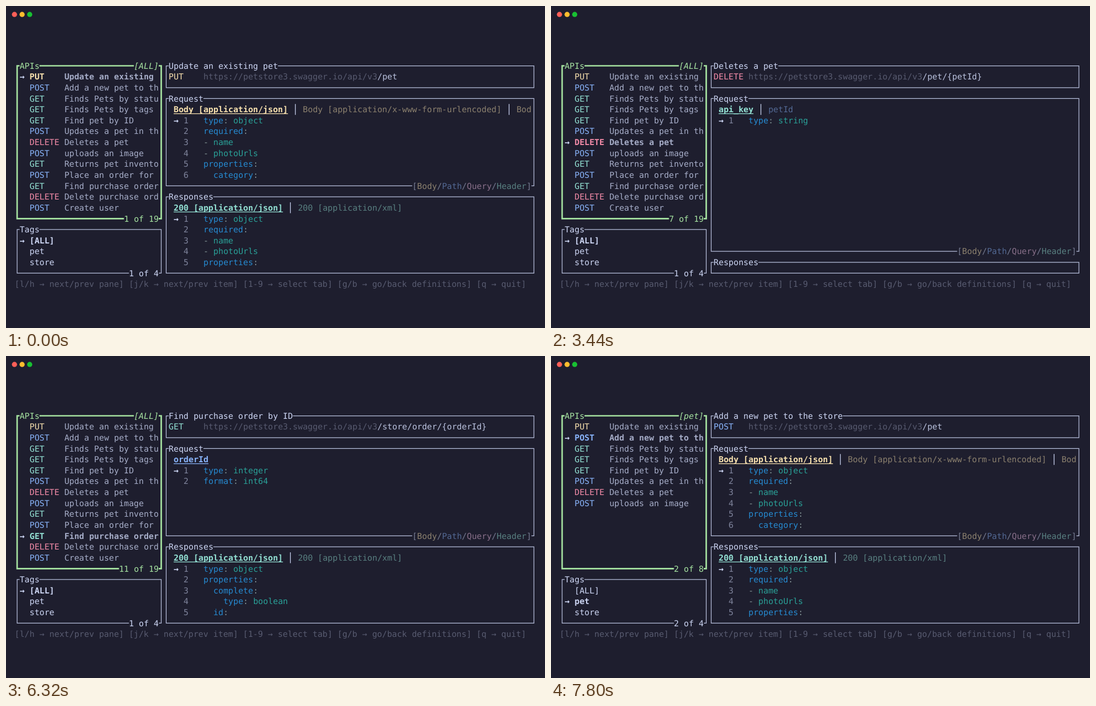
An HTML page for the animation above (8 s loop, 967 px wide and 579 px high).

```html
<!DOCTYPE html>
<html lang="en">
<head>
<meta charset="utf-8">
<title>API browser</title>
<style>
html, body { margin: 0; width: 100%; height: 100%; overflow: hidden; background: #1e1e2e; }
svg { display: block; width: 967px; height: 579px; }
text {
  font-family: "DejaVu Sans Mono", monospace;
  font-size: 14.81px;
  white-space: pre;
  text-rendering: geometricPrecision;
}
.bold { font-weight: bold; }
.italic { font-style: italic; }
</style>
</head>
<body>
<svg viewBox="0 0 967 579">
  <rect width="967" height="579" fill="#1e1e2e"/>
  <circle cx="15.2" cy="15.2" r="4.6" fill="#ff5f58"/>
  <circle cx="28.9" cy="15.2" r="4.6" fill="#ffbd2e"/>
  <circle cx="42.5" cy="15.2" r="4.6" fill="#18c132"/>
  <g id="screen"></g>
</svg>
<script>
const LOOP = 8000;
const CELL = 8.915, LINE = 19.63, LEFT = 15.5, TOP = 107.5;
const END = 104; // column of the right border

const C = {
  text: '#cdd6f4', item: '#a6adc8', dim: '#585b70', faint: '#757a91', num: '#7f849c',
  path: '#bac2de', green: '#a6e3a1', key: '#268bd2', value: '#2aa198', punct: '#839496',
};
const METHOD = { PUT: '#f9e2af', POST: '#89b4fa', GET: '#94e2d5', DELETE: '#f38ba8' };
// kind of tab: [active colour, inactive colour]
const KIND = {
  body: ['#f9e2af', '#8b806e'],
  path: ['#89b4fa', '#536994'],
  query: ['#f5c2e7', '#89708a'],
  header: ['#94e2d5', '#598081'],
};

const BODY = ['json', 'x-www-form-urlencoded', 'xml'].map(f => `body:Body [application/${f}]`);
const reply = (code, ...types) => types.map(f => `header:${code} [application/${f}]`);
const BOTH = reply(200, 'json', 'xml');

const LONG = ['type: integer', 'format: int64'];
const PET = ['type: object', 'required:', '- name', '- photoUrls', 'properties:', '  category:'];
const PETS = ['type: array', 'items:', '  type: object', '  required:', '  - name'];
const ORDER = ['type: object', 'properties:', '  complete:', '    type: boolean', '  id:', '    type: integer'];
const USER = ['type: object', 'properties:', '  email:', '    type: string', '    example: tove@mail.test', '  firstName:'];
const STATUS = ['type: string', 'enum:', '- available', '- pending', '- sold', 'default: available'];
const UPLOAD = ['type: object', 'properties:', '  code:', '    type: integer', '    format: int32'];
const COUNTS = ['type: object', 'additionalProperties:', '  type: integer', '  format: int32'];

const api = (method, title, path, reqTabs, req, resTabs, res) =>
  ({ method, title, path, reqTabs, req, resTabs, res });
const APIS = [
  api('PUT', 'Update an existing pet', '/pet', BODY, PET, BOTH, PET),
  api('POST', 'Add a new pet to the store', '/pet', BODY, PET, BOTH, PET),
  api('GET', 'Finds Pets by status', '/pet/findByStatus', ['query:status'], STATUS, BOTH, PETS),
  api('GET', 'Finds Pets by tags', '/pet/findByTags', ['query:tags'],
    ['type: array', 'items:', '  type: string'], BOTH, PETS),
  api('GET', 'Find pet by ID', '/pet/{petId}', ['path:petId'], LONG, BOTH, PET),
  api('POST', 'Updates a pet in the store with form data', '/pet/{petId}',
    ['path:petId', 'query:name', 'query:status'], LONG, [], []),
  api('DELETE', 'Deletes a pet', '/pet/{petId}', ['header:api_key', 'path:petId'], ['type: string'], [], []),
  api('POST', 'uploads an image', '/pet/{petId}/uploadImage',
    ['body:Body [application/octet-stream]', 'path:petId', 'query:additionalMetadata'],
    ['type: string', 'format: binary'], reply(200, 'json'), UPLOAD),
  api('GET', 'Returns pet inventories by status', '/store/inventory', [], [], reply(200, 'json'), COUNTS),
  api('POST', 'Place an order for a pet', '/store/order', BODY, ORDER, reply(200, 'json'), ORDER),
  api('GET', 'Find purchase order by ID', '/store/order/{orderId}', ['path:orderId'], LONG, BOTH, ORDER),
  api('DELETE', 'Delete purchase order by ID', '/store/order/{orderId}', ['path:orderId'], LONG, [], []),
  api('POST', 'Create user', '/user', BODY, USER, reply('default', 'json', 'xml'), USER),
];
const TAGS = ['[ALL]', 'pet', 'store'];

// [start in ms, selected api, selected tag, focus on tags]
const STEPS = [
  ...[0, 320, 960, 1560, 2200, 2800, 3440, 4080, 4720, 5360, 6320, 6640, 6960].map((t, i) => [t, i, 0, false]),
  [7280, 12, 0, true], [7440, 0, 1, true], [7760, 0, 1, false], [7800, 1, 1, false],
];

const screen = document.getElementById('screen');
let out = '';
const colX = c => LEFT + c * CELL;
const rowY = r => TOP + r * LINE;
const esc = s => s.replace(/&/g, '&amp;').replace(/</g, '&lt;');

function put(col, row, str, color, cls = '') {
  out += `<text x="${colX(col).toFixed(2)}" y="${(rowY(row) + 5.2).toFixed(2)}" fill="${color}" class="${cls}">${esc(str)}</text>`;
  return col + str.length;
}

function stroke(d, color, width) {
  out += `<path d="${d}" fill="none" stroke="${color}" stroke-width="${width}"/>`;
}

const arrow = (col, row) => put(col, row, '→', C.text, 'bold');

// Border with gaps for the labels: title top left, tail top right, foot bottom right.
function pane(c0, c1, r0, r1, title, { focus = false, tail = '', foot = 0 } = {}) {
  const x0 = colX(c0 + 0.5), x1 = colX(c1 + 0.5), y0 = rowY(r0), y1 = rowY(r1);
  const from = colX(c0 + 1 + title.length), to = colX(c1 - tail.length), gap = colX(c1 - foot);
  const top = tail ? `M${from} ${y0}H${to}M${colX(c1)} ${y0}H${x1}` : `M${from} ${y0}H${x1}`;
  const bottom = foot ? `V${y1}H${colX(c1)}M${gap} ${y1}H${x0}` : `V${y1}H${x0}`;
  stroke(`${top}${bottom}V${y0}H${colX(c0 + 1)}`, focus ? C.green : '#b9c1de', focus ? 2.7 : 1.25);
  const color = focus ? C.green : C.text;
  put(c0 + 1, r0, title, color);
  if (tail) put(c1 - tail.length, r0, tail, color, 'italic');
}

function listPane(r0, r1, title, tail, count, focus) {
  pane(0, 29, r0, r1, title, { focus, tail, foot: count.length });
  put(29 - count.length, r1, count, focus ? C.green : C.text);
}

function tabs(row, list) {
  let col = 32;
  list.forEach((tab, i) => {
    if (col >= END) return;
    const [kind, label] = tab.split(/:(.*)/);
    if (i) {
      const x = colX(col + 1.5);
      stroke(`M${x} ${rowY(row) - 9.8}V${rowY(row) + 9.8}`, C.text, 1.25);
      col += 3;
    }
    const start = col;
    col = put(col, row, label.slice(0, END - col), KIND[kind][i ? 1 : 0], i ? '' : 'bold');
    if (!i) stroke(`M${colX(start)} ${rowY(row) + 7.6}H${colX(col)}`, KIND[kind][0], 1.2);
  });
}

function yaml(row, lines, max) {
  lines.slice(0, max).forEach((line, i) => {
    const r = row + i;
    if (!i) arrow(32, r);
    put(34, r, String(i + 1), C.num);
    const [, pad, dash, word, colon, rest] = line.match(/^( *)(- )?(\w+)(:?)(.*)$/);
    let col = 38 + pad.length;
    if (dash) col = put(col, r, dash, C.punct);
    col = put(col, r, word, colon ? C.key : C.value);
    if (colon) col = put(col, r, colon, C.punct);
    if (rest) put(col + 1, r, rest.trim(), C.value);
  });
}

function legend(row) {
  let col = put(80, row, '[', C.faint);
  Object.keys(KIND).forEach((kind, i) => {
    if (i) col = put(col, row, '/', C.faint);
    col = put(col, row, kind[0].toUpperCase() + kind.slice(1), KIND[kind][1]);
  });
  put(col, row, ']', C.faint);
}

function draw([, sel, tag, onTags]) {
  out = '';
  const shown = tag ? APIS.slice(0, 8) : APIS;
  const cur = APIS[sel];

  listPane(0, 14, 'APIs', TAGS[tag] === 'pet' ? '[pet]' : '[ALL]', `${sel + 1} of ${tag ? 8 : 19}`, !onTags);
  shown.forEach((a, i) => {
    const cls = i === sel ? 'bold' : '';
    if (cls) arrow(1, i + 1);
    put(3, i + 1, a.method, METHOD[a.method], cls);
    put(10, i + 1, a.title.slice(0, 19), C.item, cls);
  });

  listPane(15, 19, 'Tags', '', `${tag + 1} of 4`, onTags);
  TAGS.forEach((name, i) => {
    if (i === tag) arrow(1, 16 + i);
    put(3, 16 + i, name, C.text, i === tag ? 'bold' : '');
  });

  pane(30, END, 0, 2, cur.title);
  put(31, 1, cur.method, METHOD[cur.method]);
  put(put(38, 1, 'https://petstore3.swagger.io/api/v3', C.dim), 1, cur.path, C.path);

  // An empty pane collapses and leaves its rows to the other one.
  const split = !cur.req.length ? 4 : !cur.res.length ? 17 : 11;
  pane(30, END, 3, split, 'Request', { foot: 24 });
  legend(split);
  tabs(4, cur.reqTabs);
  yaml(5, cur.req, split - 5);
  pane(30, END, split + 1, 19, 'Responses');
  tabs(split + 2, cur.resTabs);
  yaml(split + 3, cur.res, 16 - split);

  put(0, 20, '[l/h → next/prev pane] [j/k → next/prev item] [1-9 → select tab] [g/b → go/back definitions] [q → quit]', C.dim);
  screen.innerHTML = out;
}

let last = null;
function tick() {
  const t = performance.now() % LOOP;
  const step = STEPS.findLast(s => s[0] <= t);
  if (step !== last) draw(last = step);
  requestAnimationFrame(tick);
}
tick();
</script>
</body>
</html>
```
